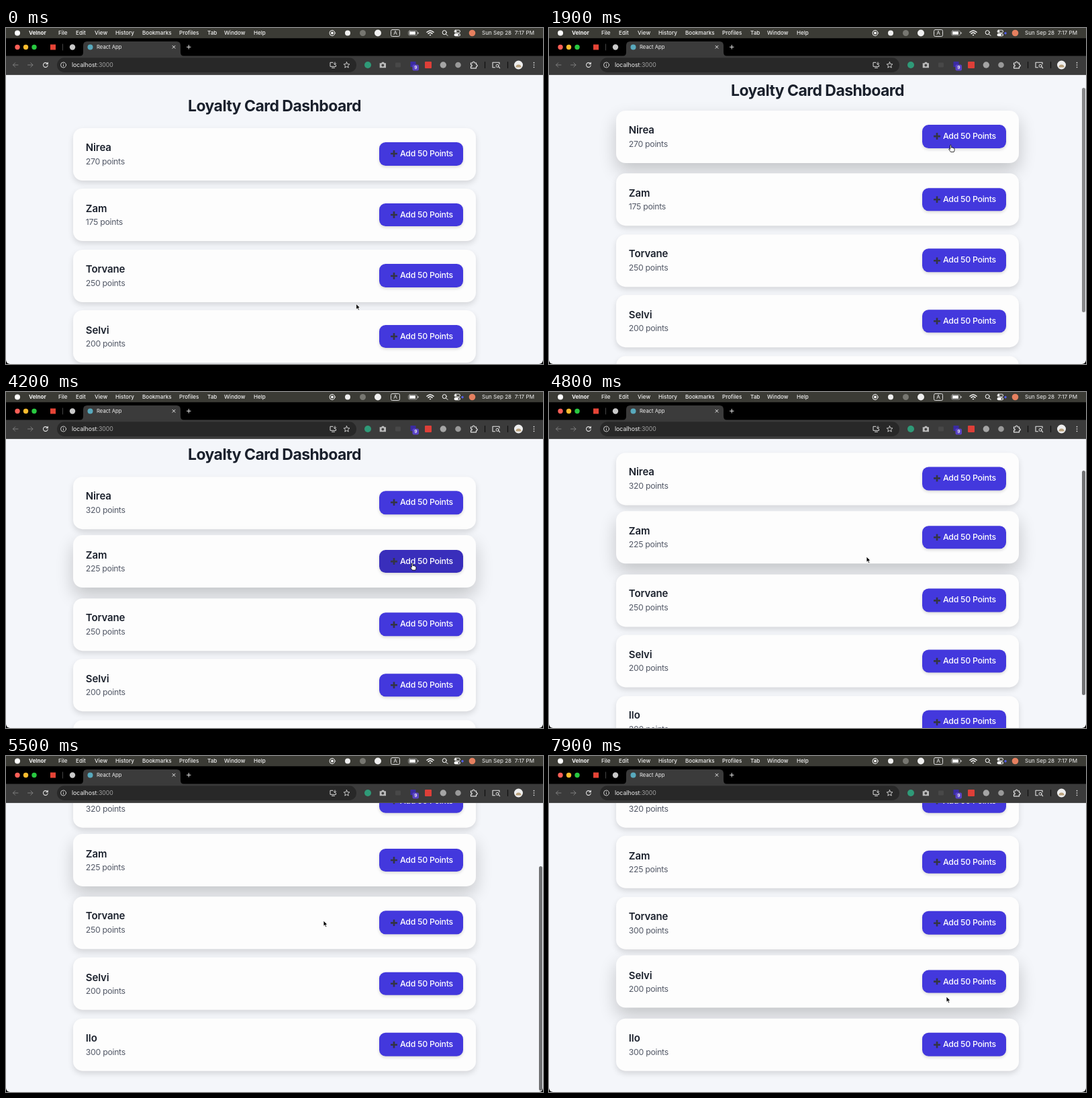
Animation of 800x500 px, one loop 8000 ms. Source, as an HTML page:

```html
<!DOCTYPE html>
<html lang="en">
<head>
<meta charset="utf-8">
<title>Loyalty Card Dashboard</title>
<style>
  html, body { margin: 0; width: 100%; height: 100%; overflow: hidden; background: #000; }
  body { font-family: Inter, "Liberation Sans", sans-serif; }
  #stage { position: relative; width: 800px; height: 500px; overflow: hidden; }
  #stage > svg { position: absolute; left: 0; top: 0; }
  #view { position: absolute; top: 70px; width: 800px; height: 430px; overflow: hidden;
          background: #f4f6fa; border-radius: 0 0 6px 6px; }
  #page { position: absolute; width: 800px; height: 550px; }
  h1 { position: absolute; margin: 0; top: 31px; width: 800px; text-align: center;
       font-size: 23px; line-height: 30px; letter-spacing: -.55px; color: #1a202c; }
  .card { position: absolute; left: 100px; width: 600px; height: 78px; border-radius: 14px; background: #fdfdfd; }
  .card > * { position: absolute; white-space: nowrap; }
  .name { left: 18.8px; top: 19.5px; font-size: 15px; font-weight: 600; line-height: 20px;
          letter-spacing: -.12px; color: #1a202c; }
  .points { left: 18.8px; top: 40px; font-size: 12.3px; line-height: 20px; letter-spacing: -.3px; color: #545a68; }
  .add { left: 456px; top: 21.6px; width: 125.3px; height: 34.6px; border-radius: 9.5px;
         box-shadow: 0 2px 4px rgba(0,0,0,.15); }
  .add span { position: absolute; left: 31px; font-size: 12.3px; font-weight: 500; line-height: 34.6px;
              letter-spacing: -.25px; color: #fff; }
  .add svg { position: absolute; left: 17px; top: 12.3px; }
  #bar { position: absolute; left: 794px; width: 5px; height: 334px; border-radius: 3px; background: #707173; }
  svg text { font-size: 8.1px; fill: #f2f2f2; white-space: pre; }
</style>
</head>
<body>
<div id="stage">
  <div id="view">
    <div id="page"><h1>Loyalty Card Dashboard</h1></div>
    <div id="bar"></div>
  </div>

  <svg width="800" height="70" fill="none" stroke-linecap="round" stroke-linejoin="round">
    <!-- menu bar -->
    <path fill="#3b3b35" d="M0 0h800v15.500h-800z"/>
    <g id="menu"></g>
    <circle cx="17" cy="7.500" r="4" fill="#fff"/>
    <circle cx="486" cy="7.500" r="4" stroke="#fff"/>
    <circle cx="486" cy="7.500" r="2" fill="#fff"/>
    <circle cx="509" cy="7.500" r="4" fill="#f0f0f0"/>
    <circle cx="531.500" cy="7.500" r="4.500" fill="#777771"/>
    <circle cx="554" cy="7.500" r="5" fill="#f0f0f0"/>
    <rect x="573.500" y="2.500" width="13" height="10" rx="2" stroke="#ddd"/>
    <rect x="599.500" y="4" width="13" height="7" rx="2" stroke="#aaa" stroke-width=".8"/>
    <path fill="#fff" d="M601 5.300h9v4.400h-9zM613.500 6.200h1v2.600h-1z"/>
    <path stroke="#fff" stroke-width="1.400" d="M627 6.200q5-4.600 10 0M629 8.400q3-2.600 6 0M631.500 10.500h1"/>
    <path stroke="#fff" d="M655.500 9l2.500 2.500"/>
    <circle cx="653.200" cy="6.700" r="3" stroke="#fff"/>
    <rect x="668" y="3.200" width="8.500" height="3.600" rx="1.800" stroke="#fff" stroke-width=".9"/>
    <rect x="667.600" y="8.100" width="9.300" height="4.200" rx="2.100" fill="#fff"/>
    <circle cx="669.900" cy="5" r="1.500" fill="#fff"/>
    <circle cx="674.600" cy="10.200" r="1.200" fill="#444"/>
    <circle id="dot" cx="680" cy="7.700" r="1.700" fill="#5360f2"/>
    <circle cx="694.500" cy="7.500" r="4.800" fill="#e5805f"/>

    <!-- tab strip -->
    <path fill="#000" d="M0 15.500h800v28h-800z"/>
    <circle cx="17" cy="28.500" r="3.700" fill="#ff5f57"/>
    <circle cx="29.500" cy="28.500" r="3.700" fill="#febc2e"/>
    <circle cx="42" cy="28.500" r="3.700" fill="#28c840"/>
    <rect x="66" y="24.500" width="8" height="8" fill="#e54436"/>
    <path stroke="#444" d="M84.500 24v9"/>
    <circle cx="99" cy="28.500" r="4.200" fill="#c9c9c9"/>
    <path fill="#3b3b3b" d="M109 42q6 0 6-6v-10q0-6 6-6h133q6 0 6 6v10q0 6 6 6z"/>
    <circle cx="125.500" cy="28.500" r="4" fill="#58a9bd"/>
    <path stroke="#e5e5e5" d="M248 26.300l4 4m0-4l-4 4M269.500 28.300h5.600m-2.800-2.800v5.600"/>

    <!-- toolbar -->
    <path fill="#3b3b3b" d="M0 41.500h800v28.500h-800z"/>
    <path stroke="#555" stroke-width=".8" d="M0 69.500h800"/>
    <rect x="76" y="44.300" width="446" height="21.700" rx="10.800" fill="#282828"/>
    <path stroke="#7c7c7c" d="M18 55h-7.500m3.200-3.200l-3.200 3.200l3.200 3.200M32.500 55h7.500m-3.200-3.200l3.200 3.200l-3.200 3.200"/>
    <path stroke="#e0e0e0" stroke-width="1.100" d="M61.800 53.200a3.400 3.400 0 1 0 .4 2.700M62.300 51.300v2.500h-2.500"/>
    <circle cx="85.500" cy="55" r="4" stroke="#ddd" stroke-width=".9"/>
    <path stroke="#ddd" stroke-width=".9" d="M85.500 54.800v2M85.500 53v.1"/>
    <path stroke="#ddd" d="M487 51.300h-4v6h8.500v-1.800M485.500 59.300h4M490 51v3.500m-1.700-1.600l1.700 1.700l1.700-1.700"/>
    <path stroke="#ddd" stroke-width=".9" d="M507.500 50.700l1.200 2.900l3.200.3l-2.400 2.100l.7 3.100l-2.700-1.700l-2.700 1.700l.7-3.100l-2.400-2.100l3.200-.3z"/>
    <circle cx="539" cy="55" r="5" fill="#2f9a78"/>
    <path fill="#bbb" d="M556.700 52.200h2.500l1-1.500h2.600l1 1.500h2.200v7h-9.300z"/>
    <circle cx="561.300" cy="55.500" r="1.900" fill="#444"/>
    <rect x="580" y="51.500" width="8" height="7" rx="1" fill="#484848"/>
    <rect x="602.500" y="50" width="8" height="8" fill="#3a2ba3"/>
    <rect x="605.500" y="54.500" width="9.500" height="9" rx="2" fill="#5a43c6"/>
    <rect x="624" y="50" width="10" height="10" rx="1" fill="#dd3f38"/>
    <circle cx="651.300" cy="55" r="4.700" fill="#a5a5a5"/>
    <circle cx="673.500" cy="55" r="4.300" fill="#999"/>
    <path stroke="#e5e5e5" stroke-width="1.200" d="M692.500 52h2.600q0-2 1.500-2t1.500 2h2.400v2.500q1.800 0 1.800 1.400t-1.800 1.400v2.500h-8v-2.600q1.800 0 1.800-1.300t-1.800-1.300z"/>
    <path stroke="#111" stroke-width="1.200" d="M713.500 50.500v9M747.500 50.500v9"/>
    <path stroke="#e5e5e5" stroke-width="1.100" d="M728.500 58.800h-3.500v-7.500h10v2.500M734 58l1.700 1.700"/>
    <circle cx="732" cy="56.300" r="2" stroke="#e5e5e5"/>
    <circle cx="763.500" cy="55" r="6.500" fill="#eee"/>
    <path fill="#b9a17c" d="M759.500 58.500a4 4 0 0 1 8 0z"/>
    <path stroke="#e5e5e5" stroke-width="1.700" d="M786.500 51.700v0M786.500 55v0M786.500 58.300v0"/>

    <text x="135" y="31.200" style="font-size:7.700px">React App</text>
    <text x="98" y="58.200" style="font-size:8.750px">localhost<tspan fill="#a2a2a2">:3000</tspan></text>
    <text x="577.200" y="10.300">A</text>
    <text x="608.200" y="61.300" style="font-size:6.500px;font-weight:700">9</text>
    <text x="709" y="10.300">Sun Sep 28&#160; 7:17 PM</text>
  </svg>

  <svg width="800" height="500" stroke-linejoin="round">
    <path id="arrow" fill="#000" stroke="#fff" stroke-width=".8"
          d="M0 0v8.300l1.900-1.700l1.300 3l1.500-.7l-1.300-2.900h2.500z"/>
    <path id="hand" fill="#fff" stroke="#000" stroke-width=".8"
          d="M-1 .8q0-1 .9-1t.9 1v3.200q.2-.8 1-.7t.8.8q.3-.5 1-.4t.7.9q1.300-.4 1.300 1v1.700q0 1.200-.9 2.800h-4.700q-1-1.500-2.500-3.500q-.6-1.100.3-1.300t1.200.9z"/>
  </svg>
</div>

<script>
const LOOP = 8000, PITCH = 90.6, LIFT = 3.1;
const $ = id => document.getElementById(id);
const clamp = x => Math.min(1, Math.max(0, x));
const smooth = x => x * x * (3 - 2 * x);
const mix = (a, b, k) => a + (b - a) * k;

// hover / press: [from, to] on the card and its button; gain: time of the added points
const cards = [
  { name: "Nirea", points: 270, hover: [850, 3520], press: [1900, 3420], gain: 2500 },
  { name: "Zam", points: 175, hover: [3560, 5450], press: [3660, 4350], gain: 4000 },
  { name: "Torvane", points: 250, hover: [5450, 7350], press: [5900, 7220], gain: 6900 },
  { name: "Selvi", points: 200, hover: [7400, 9999] },
  { name: "Ilo", points: 300 }
];
const passing = [[], [600, 800], [380, 600], [], []];   // brief hovers while moving up

// keyframes: [time, ...values]
const scrollKeys = [[950, 0], [1100, 20.7], [1250, 22.8], [4600, 22.8], [5000, 94], [5250, 115], [5500, 120.3]];
const barKeys = [[950, 0], [1050, 1], [1850, 1], [2150, 0], [4600, 0], [4700, 1], [6000, 1], [6300, 0]];
const cursorKeys = [[250, 521.7, 410.5], [950, 510.5, 189.5], [1500, 510.5, 189.5], [2050, 617.8, 171],
  [3300, 617.8, 171], [3800, 605.3, 255], [4250, 605.3, 255], [4700, 473, 245],
  [5600, 473, 245], [6100, 601.3, 256.5], [7100, 601.3, 256.5], [7600, 592, 358]];

function sample(keys, t, ease = x => x) {
  const n = keys.findIndex(k => k[0] > t);
  if (n <= 0) return keys[n ? keys.length - 1 : 0].slice(1);
  const a = keys[n - 1], b = keys[n], k = ease((t - a[0]) / (b[0] - a[0]));
  return a.slice(1).map((v, i) => mix(v, b[i + 1], k));
}

// eased 0..1 state that rises at `from` and falls at `to`
const during = (t, [from, to] = [], len = 250) =>
  from === undefined ? 0 : smooth(clamp((t - from) / len)) - smooth(clamp((t - to) / len));

const menu = [["Velnor", 34], ["File", 78], ["Edit", 104], ["View", 132], ["History", 163], ["Bookmarks", 203],
  ["Profiles", 258], ["Tab", 300], ["Window", 325], ["Help", 369]];
$("menu").innerHTML = menu.map(([word, x], i) =>
  `<text x="${x}" y="10.3" font-weight="${i ? 500 : 700}">${word}</text>`).join("");

cards.forEach((card, i) => {
  const el = card.el = document.createElement("div");
  el.className = "card";
  el.style.top = 78.5 + PITCH * i + "px";
  el.innerHTML = `<div class="name">${card.name}</div><div class="points"></div>
    <div class="add"><svg width="10" height="10"><path fill="#343445"
      d="M3.7 0h2.600v3.700h3.700v2.600h-3.700v3.700h-2.600v-3.700h-3.700v-2.600h3.700z"/></svg><span>Add 50 Points</span></div>`;
  $("page").append(el);
  card.label = el.querySelector(".points");
  card.button = el.querySelector(".add");
});

function draw(t) {
  const [scroll] = sample(scrollKeys, t);
  $("page").style.transform = `translateY(${-scroll}px)`;
  $("bar").style.top = 1 + scroll * .777 + "px";
  $("bar").style.opacity = sample(barKeys, t)[0];
  $("dot").style.opacity = t < 500 ? 0 : 1;

  cards.forEach((card, i) => {
    const h = clamp(during(t, card.hover) + during(t, passing[i]));
    const p = during(t, card.press, 150);
    card.el.style.transform = `translateY(${-LIFT * h}px)`;
    card.el.style.boxShadow = `0 ${mix(4, 12, h)}px ${mix(9, 26, h)}px rgba(0,0,0,${mix(.13, .2, h)})`;
    card.button.style.background = `rgb(${mix(67, 57, p)},${mix(56, 46, p)},${mix(221, 187, p)})`;
    card.label.textContent = card.points + (t >= card.gain ? 50 : 0) + " points";
  });

  const [x, y] = sample(cursorKeys, t, smooth);
  const onButton = cards.some(({ press }) => press && t >= press[0] && t < press[1]);
  for (const id of ["arrow", "hand"]) {
    $(id).setAttribute("transform", `translate(${x} ${y})`);
    $(id).style.display = (id === "hand") === onButton ? "" : "none";
  }
}

const start = performance.now();
(function tick() {
  draw((performance.now() - start) % LOOP);
  requestAnimationFrame(tick);
})();
</script>
</body>
</html>
```
